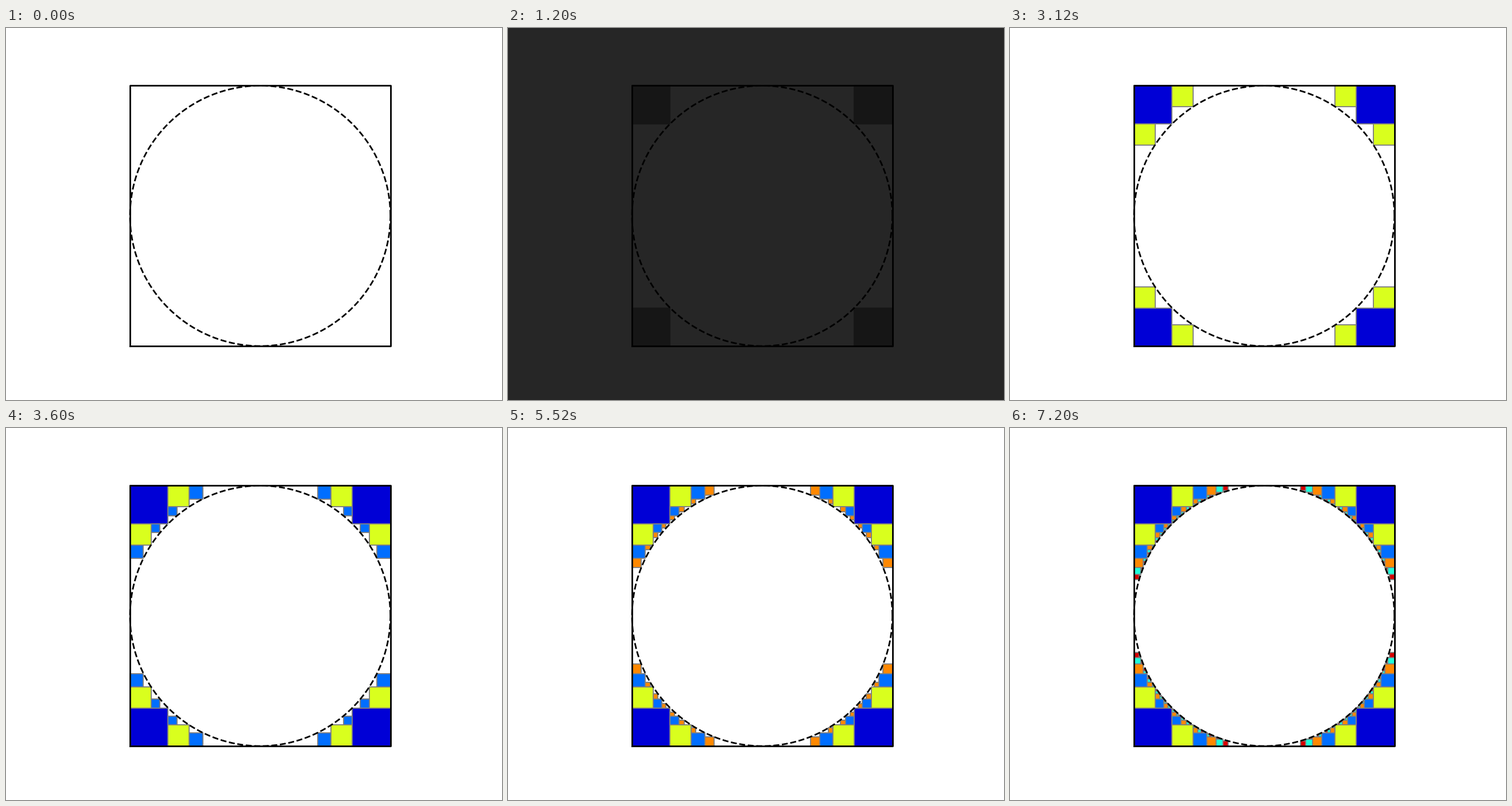
Recreate the animation shown at these times as a matplotlib script. Size 864x648 px, loop 8 s.

```python
import numpy as np
import matplotlib.pyplot as plt
from matplotlib.animation import FuncAnimation
from matplotlib.patches import Rectangle

COLORS = ["#0000d6", "#d9ff1e", "#006eff", "#ff8800", "#1effda", "#d60000"]
EDGE = "gray"
DARK_BG, DARK_SQUARE = "#262626", "#161616"
FRAMES, INTERVAL, HOLD = 20, 400, 3


def side(x, y):
    """Largest square at (x, y), measured from a corner, outside the unit circle."""
    a, b = 1 - x, 1 - y
    return (a + b - np.sqrt((a + b) ** 2 - 2 * (a * a + b * b - 1))) / 2


def generations(count):
    cells = [(0.0, 0.0)]
    for _ in range(count):
        squares = [(x, y, side(x, y)) for x, y in cells]
        yield squares
        cells = [c for x, y, s in squares for c in ((x + s, y), (x, y + s))]


def add_square(ax, x, y, s, color):
    """Draw one square mirrored into all four corners."""
    patches = []
    for left in (x - 1, 1 - x - s):
        for bottom in (y - 1, 1 - y - s):
            patch = Rectangle((left, bottom), s, s, fc=color, ec=EDGE, lw=1)
            patches.append(ax.add_patch(patch))
    return patches


fig = plt.figure(figsize=(6.4, 4.8), dpi=135)
backdrop = fig.add_artist(
    Rectangle((0, 0), 1, 1, transform=fig.transFigure, fc="white", lw=0, zorder=-1))

ax = fig.add_subplot()
ax.set_aspect("equal")
ax.axis("off")

layers = [
    [p for sq in squares for p in add_square(ax, *sq, color)]
    for squares, color in zip(generations(len(COLORS)), COLORS)
]

t = np.linspace(0, 2 * np.pi, 500)
ax.plot(np.cos(t), np.sin(t), "k--", lw=1.5)
ax.plot([-1, 1, 1, -1, -1], [-1, -1, 1, 1, -1], "k-", lw=1.5)
ax.set_xlim(-1.1, 1.1)
ax.set_ylim(-1.1, 1.1)


def update(frame):
    step = frame // HOLD
    dark = step == 1
    backdrop.set_facecolor(DARK_BG if dark else "white")
    for i, layer in enumerate(layers):
        for patch in layer:
            patch.set_visible(i < step)
            patch.set_facecolor(DARK_SQUARE if dark else COLORS[i])
            patch.set_edgecolor(DARK_SQUARE if dark else EDGE)
    return []


anim = FuncAnimation(fig, update, frames=FRAMES, interval=INTERVAL,
                     repeat=True, repeat_delay=0, blit=False)
plt.show()
```
